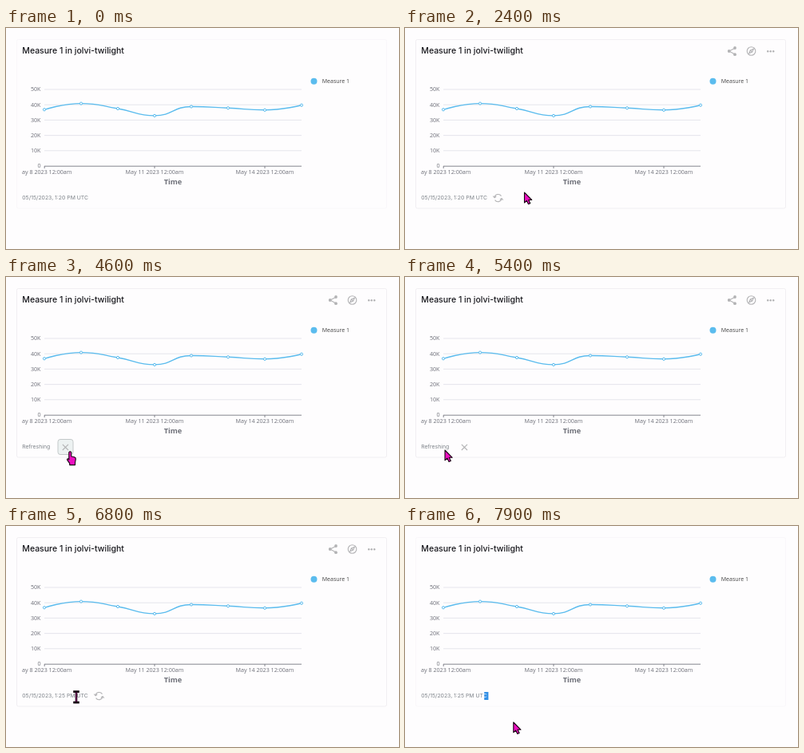
An HTML page that plays this animation: 492x277 px, repeating every 8000 ms.

```html
<!DOCTYPE html>
<html lang="en">
<head>
<meta charset="utf-8">
<title>Measure panel</title>
<style>
  html, body { margin: 0; width: 100%; height: 100%; overflow: hidden; background: #fefdfe; }
  svg { display: block; width: 492px; height: 277px; }
  text { font-family: Inter, sans-serif; }
  .axis text, .legend { font-family: "Open Sans", "Noto Sans", sans-serif; }
  .axis text { font-size: 7.15px; fill: #6e7079; }
  .small { font-size: 6.85px; fill: #7c8288; }
  .icon { fill: none; stroke: #b3b3b5; stroke-width: 1.1; }
  .box { fill: #edf2f2; stroke: #c4c9ca; }
  .pointer { fill: #ec0fc0; stroke: #150510; stroke-width: 1.1; stroke-linejoin: round; }
</style>
</head>
<body>
<svg viewBox="0 0 492 277">
  <rect id="frame" x="13.5" y="14.5" width="463" height="211.5" rx="2" fill="#fefdfe" stroke="#f5f3f6"/>
  <text x="20.3" y="31.6" font-size="10.5" font-weight="500" fill="#17171c">Measure 1 in jolvi-twilight</text>

  <g id="tools">
    <path class="icon" d="M413 25.2L405.8 29L413 33"/>
    <g fill="#b3b3b5">
      <circle cx="413" cy="25" r="1.9"/><circle cx="405.7" cy="29" r="1.9"/><circle cx="413" cy="33.2" r="1.9"/>
      <circle cx="454.2" cy="29.2" r="1.2"/><circle cx="457.7" cy="29.2" r="1.2"/><circle cx="461.2" cy="29.2" r="1.2"/>
    </g>
    <circle class="icon" cx="433.5" cy="29" r="5.3" stroke-width="1"/>
    <path class="icon" d="M430.8 31.8L432.3 28L436.3 26.3L434.7 30.1ZM432.4 28L434.6 30.1" stroke-width=".8"/>
  </g>

  <g id="chart" class="axis"></g>
  <circle cx="385.5" cy="66.7" r="4" fill="#5bbcee"/>
  <text class="legend" x="395.8" y="69.2" font-size="7" fill="#444">Measure 1</text>

  <rect id="mark" x="99.2" y="208" width="5.2" height="10" fill="#3390e6"/>
  <text id="status" class="small" x="20.3" y="215.3"></text>

  <g id="reload">
    <rect id="reloadBox" class="box" x="107" y="203.5" width="19" height="19" rx="3"/>
    <path class="icon" d="M112.1 212.2A4.6 4.6 0 0 1 120.5 210.6M121 214A4.6 4.6 0 0 1 112.6 215.6" stroke="#a8b0b2"/>
    <path class="icon" d="M110.4 210.6L112.1 212.7L114.2 211M122.7 215.6L121 213.5L118.9 215.2"/>
  </g>
  <g id="cancel">
    <rect id="cancelBox" class="box" x="65" y="203.5" width="19" height="19" rx="3"/>
    <path class="icon" d="M70.8 209.8L78 217M78 209.8L70.8 217"/>
  </g>
  <g id="tip">
    <rect x="91" y="231" width="51" height="14" rx="2" fill="#69696b"/>
    <text x="116.5" y="240.3" text-anchor="middle" font-size="6.35" font-weight="600" fill="#fff">Refresh panel</text>
  </g>

  <g id="cursor" class="pointer">
    <path id="arrow" d="M0 0V12.8L2.9 10.2L5 14.6L7.3 13.6L5.3 9.3H9.2Z"/>
    <path id="hand" d="M-1.5 1Q0-1.2 1.4 1V6L5.4 6.9Q7.2 7.4 7 9.4L6.2 14.2V16.8H-.6V14.8L-3.6 10.6Q-4.2 8.8-2.4 9L-1.5 10Z"/>
    <g id="beam" fill="none">
      <path d="M-3.8-7H3.8M0-7V6.5M-3.8 6.5H3.8" stroke-width="2.6"/>
      <path d="M0-6V5.5" stroke="#b00a90" stroke-width=".8"/>
    </g>
  </g>
</svg>
<script>
const $ = id => document.getElementById(id);
const LOOP = 8000, STEP = 100;

function add(parent, tag, attrs, text) {
  const el = document.createElementNS("http://www.w3.org/2000/svg", tag);
  for (const k in attrs) el.setAttribute(k, attrs[k]);
  if (text) el.textContent = text;
  return parent.appendChild(el);
}

function smoothPath(pts) {
  // horizontal handles at local extremes, neighbour slope elsewhere
  const slope = pts.map((p, i) => {
    const a = pts[i - 1], b = pts[i + 1];
    if (!a || !b || (p[1] - a[1]) * (b[1] - p[1]) <= 0) return 0;
    return (b[1] - a[1]) / 4;
  });
  let d = "M" + pts[0];
  for (let i = 1; i < pts.length; i++) {
    const [x0, y0] = pts[i - 1], [x1, y1] = pts[i];
    const h0 = i === 1 ? 0 : 23, h1 = i === pts.length - 1 ? 0 : 23;
    d += `C${x0 + h0} ${y0 + slope[i - 1]} ${x1 - h1} ${y1 - slope[i]} ${x1} ${y1}`;
  }
  return d;
}

function drawChart() {
  const g = $("chart");
  for (let i = 0; i <= 5; i++) {
    const y = 173 - i * 19.2;
    if (i) add(g, "path", { d: `M48 ${y}H370`, stroke: "#e3e4ea", "stroke-width": .9 });
    add(g, "text", { x: 43.5, y: y + 2.3, "text-anchor": "end" }, i ? i * 10 + "K" : "0");
  }
  add(g, "path", { d: "M48 173.2H370M48.2 173V176M186 173V176M324 173V176", stroke: "#777983", "stroke-width": .9 });
  const clip = add(g, "clipPath", { id: "edge" });
  add(clip, "rect", { x: 20, y: 170, width: 360, height: 30 });
  const labels = add(g, "g", { "clip-path": "url(#edge)" });
  [8, 11, 14].forEach((day, i) =>
    add(labels, "text", { x: 48 + i * 138, y: 183, "text-anchor": "middle" }, `May ${day} 2023 12:00am`));
  add(g, "text", { x: 209, y: 196.2, "text-anchor": "middle", style: "font-size:9.2px;font-weight:700" }, "Time");

  const pts = [102.3, 94.6, 101, 109.9, 98.5, 100.3, 102.8, 96.7].map((y, i) => [48 + i * 46, y]);
  add(g, "path", { d: smoothPath(pts), fill: "none", stroke: "#5bbcee", "stroke-width": 1.4 });
  for (const [cx, cy] of pts)
    add(g, "circle", { cx, cy, r: 1.6, fill: "#fff", stroke: "#5bbcee", "stroke-width": 1 });
}

// time, x, y, shape from that time on
const path = [
  [500, 208, 272, "arrow"], [800, 214, 236, "arrow"], [1000, 216, 214, "arrow"], [1300, 217, 221, "arrow"],
  [1600, 217.6, 244, "arrow"], [1800, 206, 225, "arrow"], [2000, 184, 208, "arrow"], [2300, 157, 204, "arrow"],
  [2700, 127, 212.8, "hand"], [3500, 127, 212.8, "arrow"], [4300, 127, 212.8, "arrow"],
  [4500, 98, 216, "arrow"], [4600, 80.3, 218.8, "hand"], [4800, 54, 223, "arrow"], [5000, 36, 220, "arrow"],
  [5400, 50, 217, "arrow"], [5900, 23, 212, "arrow"], [6200, 24.5, 211.6, "arrow"], [6500, 52, 212, "arrow"],
  [6600, 66, 214, "beam"], [6900, 99, 215, "beam"], [7300, 133, 228, "beam"],
  [7500, 136, 238, "arrow"], [7700, 134.6, 245.4, "arrow"], [7900, 135.8, 246, "arrow"]
];
const dots = [[3700, 1], [4000, 2], [4200, 3], [4400, 0], [4700, 1], [5000, 2], [5200, 3], [5400, 0]];

const within = (t, ...spans) => spans.some(([a, b]) => t >= a && t < b);
const show = (id, on) => { $(id).style.display = on ? "" : "none"; };

function moveCursor(t) {
  show("cursor", t >= path[0][0]);
  if (t < path[0][0]) return;
  const i = path.findLastIndex(p => p[0] <= t);
  const a = path[i], b = path[i + 1] || a;
  const k = b === a ? 0 : (t - a[0]) / (b[0] - a[0]);
  const x = a[1] + (b[1] - a[1]) * k, y = a[2] + (b[2] - a[2]) * k;
  $("cursor").setAttribute("transform", `translate(${x} ${y})`);
  for (const id of ["arrow", "hand", "beam"]) show(id, id === a[3]);
}

function setStatus(t, busy) {
  const el = $("status"), marked = t >= 7000;
  if (busy) {
    const d = dots.findLast(p => p[0] <= t);
    el.textContent = "Refreshing" + ".".repeat(d ? d[1] : 0);
  } else {
    el.textContent = `05/15/2023, 1:${t < 3500 ? 20 : 25} PM UT`;
    add(el, "tspan", marked ? { fill: "#fff" } : {}, "C");
  }
  show("mark", marked);
}

function render(t) {
  const busy = within(t, [3500, 6500]);
  const hover = within(t, [1000, 1400], [1800, 7500]);
  moveCursor(t);
  setStatus(t, busy);
  show("tools", hover);
  $("frame").setAttribute("stroke", hover ? "#f1eff2" : "#f9f7fa");
  show("reload", hover && !busy);
  show("reloadBox", within(t, [2600, 3500], [7000, 7500]));
  show("cancel", busy);
  show("cancelBox", within(t, [4600, 4800]));
  show("tip", within(t, [2800, 3500], [7100, 7500]));
}

drawChart();
let start, last = -1;
function tick(now) {
  start ??= now;
  const t = Math.floor((now - start) % LOOP / STEP) * STEP;
  if (t !== last) render(last = t);
  requestAnimationFrame(tick);
}
render(0);
requestAnimationFrame(tick);
</script>
</body>
</html>
```
